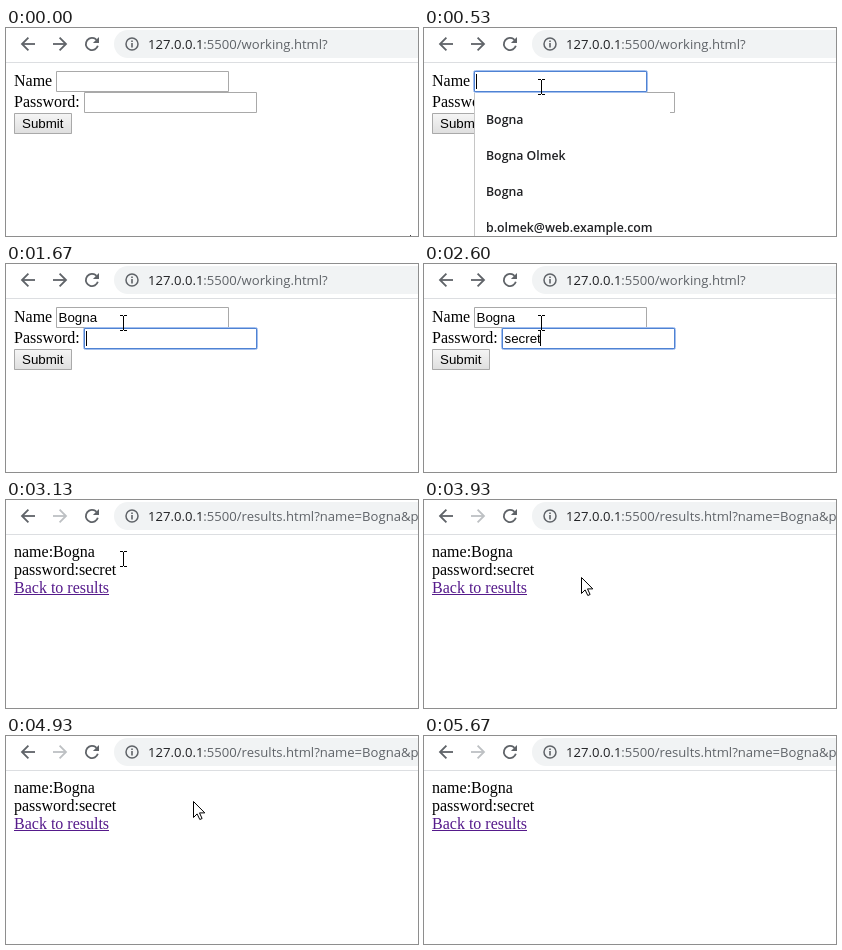
These frames come from a looping animation (412x208 px, 5990 ms). An HTML page with a canvas:

```html
<!DOCTYPE html>
<html lang="en">
<head>
<meta charset="utf-8">
<title>Form demo</title>
<style>
html, body { margin: 0; width: 100%; height: 100%; overflow: hidden; background: #fff; }
canvas { display: block; }
</style>
</head>
<body>
<canvas id="stage" width="412" height="208"></canvas>
<script>
const ctx = document.getElementById('stage').getContext('2d');
const LOOP = 5990;
const TICK = 66.25;
const SANS = '13.33px "Liberation Sans", sans-serif';
const SERIF = '16px "Liberation Serif", serif';
const URL_FONT = '13.1px "Open Sans", sans-serif';
const LIST_FONT = '600 12.3px "Open Sans", sans-serif';
const GREY = '#5f6368';

const NAME = 'Bogna';
const SECRET = 'secret';
const PEOPLE = [NAME, NAME + ' Olmek', NAME, 'b.olmek@web.example.com'];

// Key moments in ms
const FOCUS_NAME = 530, CLOSE_LIST = 1530, FOCUS_SECRET = 1600;
const SEND = 2930, RESULTS = 3070, LOADED = 3130;

// Pointer moves as Bezier curves, taken in whole ticks
const REST = [117, 59], MID = [96, 136], SIDE = [178, 74], LOW = [168, 94];
const MOVES = [
  { start: 70, ticks: 3, curve: [[404, 207], REST] },
  { start: 3870, ticks: 9, curve: [REST, [295, 110], [-103, 200], MID] },
  { start: 4470, ticks: 9, curve: [MID, [150, 130], [215, 32], SIDE] },
  { start: 5270, ticks: 2, curve: [SIDE, LOW] },
  { start: 5470, ticks: 4, curve: [LOW, [40, 239]] }
];

const within = (t, from, to) => t >= from && t < to;

// Types a word evenly, from its first to its last key press
function typed(word, first, last, t) {
  const gap = (last - first) / (word.length - 1);
  return word.slice(0, Math.max(0, Math.floor((t - first) / gap + 1.001)));
}

function bezier(points, p) {
  if (points.length === 1) return points[0];
  const [x0, y0] = bezier(points.slice(0, -1), p);
  const [x1, y1] = bezier(points.slice(1), p);
  return [x0 + (x1 - x0) * p, y0 + (y1 - y0) * p];
}

function rect(x, y, w, h, color) {
  ctx.fillStyle = color;
  ctx.fillRect(x, y, w, h);
}

function frame(x, y, w, h, color, radius = 0) {
  ctx.strokeStyle = color;
  ctx.lineWidth = 1;
  ctx.beginPath();
  ctx.roundRect(x + 0.5, y + 0.5, w - 1, h - 1, radius);
  ctx.stroke();
}

function text(str, x, y, font, color = '#000') {
  ctx.font = font;
  ctx.fillStyle = color;
  ctx.fillText(str, x, y);
  return x + ctx.measureText(str).width;
}

function trace(points) {
  ctx.beginPath();
  points.forEach(([x, y]) => ctx.lineTo(x, y));
}

function line(...points) {
  trace(points);
  ctx.stroke();
}

function navArrow(cx, dir, color) {
  const tip = cx + 6 * dir, back = cx - 0.4 * dir;
  ctx.strokeStyle = color;
  line([cx - 7 * dir, 16], [tip, 16]);
  line([back, 9.6], [tip, 16], [back, 22.4]);
}

function reloadIcon() {
  ctx.beginPath();
  ctx.arc(86, 16, 6.1, 0.3, -0.75);
  ctx.stroke();
  trace([[93, 9], [93, 15.1], [86.9, 15.1]]);
  ctx.fill();
}

function toolbar(url, canGoForward, loading) {
  rect(0, 34, 412, 1, '#dcdee1');
  ctx.fillStyle = '#f1f3f4';
  ctx.beginPath();
  ctx.roundRect(108, 2, 340, 28, 14);
  ctx.fill();

  ctx.lineWidth = 1.8;
  navArrow(54, 1, canGoForward ? GREY : '#bdc0c3');
  navArrow(22, -1, GREY);
  ctx.fillStyle = GREY;
  if (loading) {
    line([80.5, 10.5], [91.5, 21.5]);
    line([91.5, 10.5], [80.5, 21.5]);
  } else {
    reloadIcon();
  }

  ctx.lineWidth = 1.5;
  ctx.beginPath();
  ctx.arc(126, 16, 6, 0, Math.PI * 2);
  ctx.stroke();
  rect(125.2, 12.5, 1.6, 1.5, GREY);
  rect(125.2, 15, 1.6, 4.5, GREY);

  const end = text('127.0.0.1', 142, 21, URL_FONT, '#202124');
  text(':5500/' + url, end, 21, URL_FONT, GREY);
}

function field(x, y, value, focused) {
  rect(x, y, 173, 21, '#fff');
  if (focused) {
    frame(x - 1, y - 1, 175, 23, '#a3bfee', 2);
    frame(x, y, 173, 21, '#4f82d3');
  } else {
    frame(x, y, 173, 21, '#a9a9a9');
  }
  const end = text(value, x + 2.5, y + 15, SANS);
  if (focused) rect(Math.floor(end), y + 3, 1, 15, '#000');
}

function button() {
  const shade = ctx.createLinearGradient(0, 85, 0, 106);
  shade.addColorStop(0, '#f6f6f6');
  shade.addColorStop(1, '#dedede');
  rect(8, 85, 58, 21, shade);
  frame(8, 85, 58, 21, '#a9a9a9');
  text('Submit', 16, 100, SANS);
}

function dropdown(x, y, w, items) {
  const h = items.length * 36 + 16;
  rect(x, y, w, h, '#fff');
  rect(x, y, 1, h, '#c6c6c6');
  rect(x, y + h, w, 1, '#d4d4d4');
  items.forEach((item, i) => text(item, x + 12, y + 31 + i * 36, LIST_FONT, '#202124'));
}

function formPage(t) {
  const onName = within(t, FOCUS_NAME, FOCUS_SECRET);
  const drawName = () => field(50, 43, typed(NAME, 1070, 1470, t), onName);
  const drawSecret = () => field(78, 64, typed(SECRET, 1870, 2600, t), t >= FOCUS_SECRET);

  text('Name', 8, 58, SERIF);
  text('Password:', 8, 79, SERIF);
  button();
  // The focused field goes on top
  const order = onName ? [drawSecret, drawName] : [drawName, drawSecret];
  order.forEach(paint => paint());
  if (within(t, FOCUS_NAME, CLOSE_LIST)) dropdown(50, 65, 196, PEOPLE);
  if (within(t, 1870, 2330)) dropdown(78, 86, 191, [SECRET]);
}

function resultsPage() {
  text('name:' + NAME, 8, 57, SERIF);
  text('password:' + SECRET, 8, 75, SERIF);
  const end = text('Back to results', 8, 93, SERIF, '#551a8b');
  rect(8, 94, Math.round(end) - 8, 1, '#551a8b');
}

function beam(x, y) {
  for (const row of [y - 8, y + 7]) {
    rect(x - 3, row, 3, 1, '#000');
    rect(x + 1, row, 3, 1, '#000');
  }
  rect(x, y - 7, 1, 14, '#000');
}

function arrow(x, y) {
  ctx.save();
  ctx.translate(Math.round(x) + 0.5, Math.round(y) + 0.5);
  trace([[0, 0], [0, 16], [3.6, 12.4], [6.3, 18], [8.6, 17], [6, 11.4], [11.3, 11.4]]);
  ctx.closePath();
  ctx.fillStyle = '#fff';
  ctx.fill();
  ctx.strokeStyle = '#000';
  ctx.lineWidth = 1;
  ctx.stroke();
  ctx.restore();
}

function pointer(t) {
  const { start, ticks, curve } = MOVES.findLast(move => t >= move.start) || MOVES[0];
  const tick = Math.floor((t - start + 3) / TICK) + 1;
  const [x, y] = bezier(curve, Math.min(Math.max(tick, 0) / ticks, 1));
  const overText = within(t, 200, SEND) || within(t, LOADED, 3870);
  if (t < 70) arrow(...curve[0]);
  else if (overText) beam(x, y);
  else arrow(x, y);
}

function draw(t) {
  const sent = t >= SEND;
  rect(0, 0, 412, 208, '#fff');
  toolbar(sent ? `results.html?name=${NAME}&password=${SECRET}` : 'working.html?',
    !sent, within(t, SEND, LOADED));
  if (t < RESULTS) formPage(t);
  else resultsPage();
  pointer(t);
}

const begin = performance.now();
function loop() {
  draw((performance.now() - begin) % LOOP);
  requestAnimationFrame(loop);
}
loop();
</script>
</body>
</html>
```
